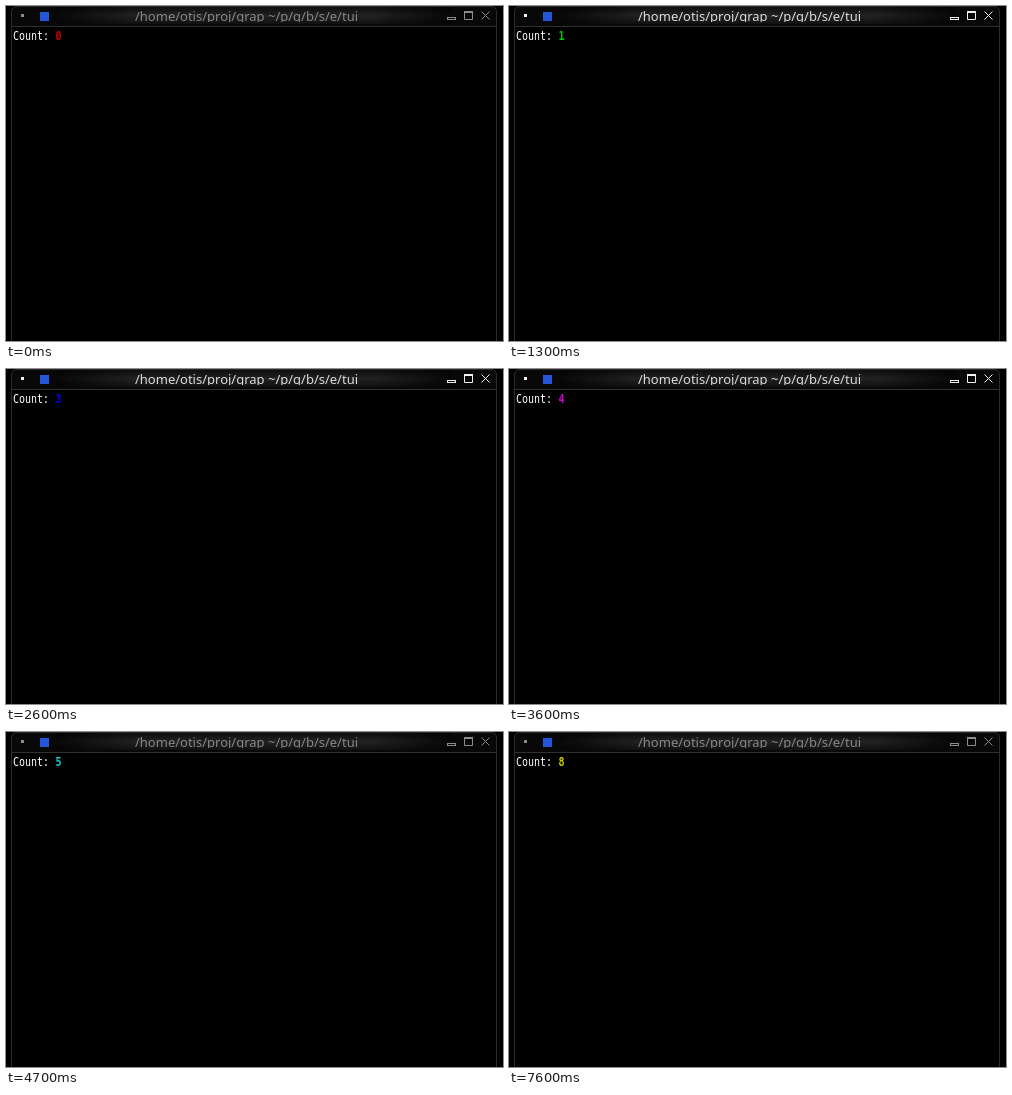
An HTML page for the animation above (8 s loop, 497x335 px).

```html
<!DOCTYPE html>
<html lang="en">
<head>
<meta charset="utf-8">
<title>Terminal counter</title>
<style>
  html, body { margin: 0; width: 100%; height: 100%; overflow: hidden; background: #000; }
  svg { display: block; }
  #chrome { color: #8c8c8c; }
  #chrome.focused { color: #f2f2f2; }
  .title { font: 13px "Noto Sans", "Open Sans", sans-serif; fill: #8a8682; }
  .focused .title { fill: #dcdcdc; }
  .term { font: 10px "DejaVu Sans Mono", monospace; fill: #fff; white-space: pre; }
  #digit { font-weight: bold; }
</style>
</head>
<body>
<svg width="497" height="335" viewBox="0 0 497 335">
  <defs>
    <linearGradient id="sheen">
      <stop offset="0" stop-color="#222" stop-opacity="0"/>
      <stop offset=".2" stop-color="#222"/>
      <stop offset=".8" stop-color="#222"/>
      <stop offset="1" stop-color="#222" stop-opacity="0"/>
    </linearGradient>
    <linearGradient id="shade" x2="0" y2="1">
      <stop offset="0" stop-color="#000" stop-opacity=".6"/>
      <stop offset=".5" stop-color="#000" stop-opacity="0"/>
      <stop offset="1" stop-color="#000" stop-opacity=".5"/>
    </linearGradient>
    <clipPath id="titleClip"><rect x="100" width="290" height="16"/></clipPath>
  </defs>

  <rect width="497" height="335"/>
  <path d="M5.5 335V6Q5.5 .5 11 .5H485Q490.5 .5 490.5 6V335" fill="#080808" stroke="#2c2c2c"/>
  <rect x="50" y="1" width="396" height="17" fill="url(#sheen)"/>
  <rect x="50" y="1" width="396" height="17" fill="url(#shade)"/>
  <rect x="6" y="20" width="484" height="1" fill="#303030"/>
  <rect x="6" y="21" width="484" height="314"/>

  <g id="chrome">
    <rect x="15" y="8" width="3" height="3" fill="currentColor"/>
    <rect x="34" y="6" width="9" height="9" fill="#2456d8"/>
    <g clip-path="url(#titleClip)">
      <text class="title" x="129" y="15">/home/otis/proj/grap ~/p/g/b/s/e/tui</text>
    </g>
    <g fill="none" stroke="currentColor">
      <rect x="441.5" y="11.5" width="8" height="2"/>
      <path d="M458.5 6V13.5H466.5V6M458 6H467" />
      <path d="M458 6H467" stroke-width="2"/>
      <path d="M475.5 5.5L483.5 13.5M483.5 5.5L475.5 13.5"/>
    </g>
  </g>

  <g class="term" transform="translate(7 34) scale(1 1.2)">
    <text>Count:</text>
    <text id="digit" x="42.5">0</text>
  </g>
</svg>
<script>
  const LOOP = 8000;
  const FIRST_TICK = 600, TICK = 1000;
  const FOCUS_IN = 1300, FOCUS_OUT = 4700;
  const COLORS = ['#cd0000', '#00cd00', '#cdcd00', '#0000ee', '#cd00cd', '#18cdcd'];

  const chrome = document.getElementById('chrome');
  const digit = document.getElementById('digit');

  function render(t) {
    const count = Math.floor((t - FIRST_TICK) / TICK) + 1;
    if (digit.textContent !== String(count)) digit.textContent = count;
    digit.style.fill = COLORS[count % COLORS.length];
    chrome.classList.toggle('focused', t >= FOCUS_IN && t < FOCUS_OUT);
  }

  const start = performance.now();
  function loop() {
    render((performance.now() - start) % LOOP);
    requestAnimationFrame(loop);
  }
  loop();
</script>
</body>
</html>
```
